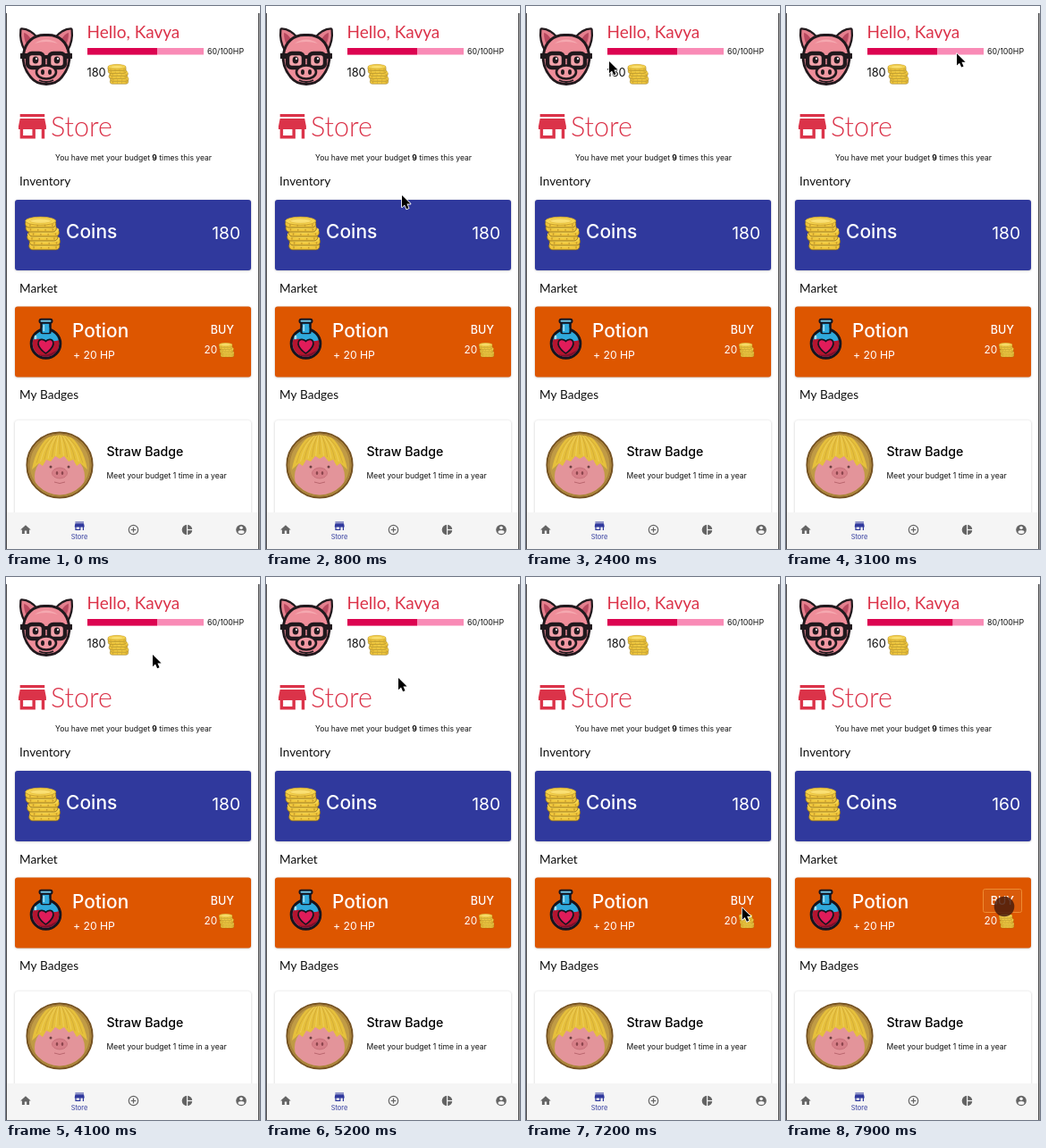
Animation of 284x608 px, one loop 8 s. Source, as an HTML page with a canvas:

```html
<!DOCTYPE html>
<html lang="en">
<head>
<meta charset="utf-8">
<title>Budget store</title>
<style>
html, body { margin: 0; width: 100%; height: 100%; overflow: hidden; background: #fff; }
canvas { display: block; width: 284px; height: 608px; }
</style>
</head>
<body>
<canvas id="stage"></canvas>
<script>
const W = 284, H = 608, LOOP = 8000, STEP = 100;
const canvas = document.getElementById('stage');
const c = canvas.getContext('2d');
const ratio = window.devicePixelRatio || 1;
canvas.width = W * ratio;
canvas.height = H * ratio;

const SANS = 'Inter, Roboto, sans-serif', LATO = 'Lato, sans-serif';
const RED = '#db3349', BLUE = '#30399d', ORANGE = '#dd5600', INK = '#111', GREY = '#646464';
const STORE = 'M20 4H4v2h16V4zm1 10v-2l-1-5H4l-1 5v2h1v6h10v-6h4v6h2v-6h1zm-9 4H6v-4h6v4z';
const HOME = 'M10 20v-6h4v6h5v-8h3L12 3 2 12h3v8z';
const ARROW = 'M0 0V14.4L3.3 11.3 5.6 16.6 8.2 15.5 5.9 10.4H10.4Z';

const APPEAR = 800, PRESS = 7500, PAID = 7600, BAR_START = 7635, BAR_TIME = 400;
// time, x, y of the pointer tip
const PATH = [
  [800, 152, 212], [1600, 121, 127], [1900, 93, 62], [2400, 93, 62],
  [3200, 205, 52], [3500, 219, 56], [3700, 178, 53], [4000, 175, 58],
  [4100, 164, 87], [4700, 148, 113], [5200, 148, 113], [6000, 244, 266],
  [6300, 243, 278], [6500, 238, 352], [7100, 241, 371], [7500, 244, 369]
];

function text(str, x, y, size, color = INK, weight = 400, family = SANS, align = 'left') {
  c.font = `${weight} ${size}px ${family}`;
  c.fillStyle = color;
  c.textAlign = align;
  c.fillText(str, x, y);
  return c.measureText(str).width;
}

function paint(fill, stroke, width = 1) {
  if (fill) { c.fillStyle = fill; c.fill(); }
  if (stroke) { c.strokeStyle = stroke; c.lineWidth = width; c.stroke(); }
}

function oval(x, y, rx, ry, fill, stroke, width) {
  c.beginPath();
  c.ellipse(x, y, rx, ry, 0, 0, 7);
  paint(fill, stroke, width);
}

function box(x, y, w, h, r, fill, stroke, width) {
  c.beginPath();
  c.roundRect(x, y, w, h, r);
  paint(fill, stroke, width);
}

function shape(d, x, y, scale, fill, stroke, width) {
  const p = new Path2D(d);
  c.save();
  c.translate(x, y);
  c.scale(scale, scale);
  c.lineJoin = 'round';
  if (stroke) { c.strokeStyle = stroke; c.lineWidth = width; c.stroke(p); }
  if (fill) { c.fillStyle = fill; c.fill(p); }
  c.restore();
}

function card(y, h, fill) {
  c.save();
  c.shadowColor = 'rgba(0,0,0,.25)';
  c.shadowBlur = 2.5 * ratio;
  c.shadowOffsetY = .6 * ratio;
  box(10, y, 264, h, 3, fill);
  c.restore();
}

// Pile of coins, drawn in a 38 by 37 box
function coins(x, y, w) {
  c.save();
  c.translate(x, y);
  c.scale(w / 38, w / 38);
  [21, 21.5, 19, 20.5, 17.5, 17].forEach((cx, i) => {
    const cy = 29 - i * 4.8;
    box(cx - 16.5, cy - 1, 33, 8, 4, '#efc63c', '#8a6a1c', .8);
    c.fillStyle = '#c4962a';
    for (let k = -3; k <= 3; k += 2) c.fillRect(cx + k * 4, cy + 3.6, 1.4, 2);
    oval(cx, cy, 16.3, 4.2, '#f7d650');
  });
  oval(17, 5, 16.3, 4.4, '#f7d650', '#b98f2a', .7);
  oval(17, 5, 11.5, 2.5, '#fae073', '#ddb236', .6);
  c.restore();
}

function pig() {
  const line = '#21191d', skin = '#ee8d99';
  for (const side of [-1, 1]) {
    c.save();
    c.translate(45, 0);
    c.scale(side, 1);
    shape('M11 36Q18 27 27.5 26.5Q29 39 23 49Z', 0, 0, 1, '#e5808e', line, 4.5);
    shape('M17 37Q21 31 25 30Q25 38 22 43Z', 0, 0, 1, '#b94a60');
    c.restore();
  }
  shape('M45 34C58 33 67 41 69 54C71 66 65 74 61 79C57 84 51 86 45 86C39 86 33 84 29 79C25 74 19 66 21 54C23 41 32 33 45 34Z', 0, 0, 1, skin, line, 6);
  shape('M32 42Q45 33 58 42Q45 38 32 42Z', 0, 0, 1, '#f5a9b0');
  for (const x of [33, 57]) {
    box(x - 9, 53, 18, 16, 5, '#f3a3ab', line, 4.5);
    oval(x, 60.5, 3.3, 4, line);
    oval(x + 1, 59, 1, 1.2, '#fff');
  }
  c.fillStyle = line;
  c.fillRect(41, 55, 8, 4);
  c.fillRect(16, 53, 9, 6);
  c.fillRect(65, 53, 9, 6);
  oval(45, 74, 11, 7.5, '#f199a3', line, 2.6);
  oval(41, 74, 2, 3, line);
  oval(49, 74, 2, 3, line);
  shape('M37 83Q45 87 53 83', 0, 0, 1, null, line, 1.8);
}

function flask() {
  const line = '#14141f', glass = '#2fa9dc';
  oval(44.5, 378, 16.3, 16.3, glass, line, 3);
  c.save();
  c.beginPath();
  c.arc(44.5, 378, 14.8, 0, 7);
  c.clip();
  shape('M26 375Q35 371 44 374T63 373V397H26Z', 0, 0, 1, '#b5142f');
  shape('M26 386Q45 398 63 380V398H26Z', 0, 0, 1, '#7d0f2b');
  c.restore();
  box(39.5, 354, 10, 12, 1, glass, line, 2.5);
  c.fillStyle = glass;
  c.fillRect(40.7, 360, 7.6, 6);
  box(37.5, 350.8, 14, 4, 2, '#6cc4e8', line, 2);
  c.fillStyle = '#a9e2f3';
  c.fillRect(41.5, 357, 1.6, 7);
  shape('M44.5 388C31 378 38.5 370 44.5 376.5C50.5 370 58 378 44.5 388Z', 0, 0, 1, '#e01c5a', line, 3.4);
  oval(33, 371, 1.4, 2.4, '#a9e2f3');
}

function badge() {
  oval(60, 514, 36.6, 36.6, '#c09b45', '#755222', 2);
  oval(60, 514, 34.4, 34.4, null, '#a9823a', 2);
  c.save();
  c.beginPath();
  c.arc(60, 514, 33.4, 0, 7);
  c.clip();
  oval(60, 527, 28, 27, '#e3949a');
  // straw fringe: a dome with a jagged lower edge
  shape('M60 477C75 479 87 496 91 519L83 512 79 515 75 508 70 510 65 504 60 507 55 504 50 510 45 508 41 515 37 512 29 519C33 496 45 479 60 477Z', 0, 0, 1, '#e6c03c');
  for (let i = -6; i <= 6; i++) {
    c.beginPath();
    c.moveTo(60 + i * .6, 479);
    c.quadraticCurveTo(60 + i * 3.3, 488, 60 + i * 4.3, 502 + Math.abs(i) * 1.6);
    paint(null, i % 2 ? '#f0d264' : '#d0a636', .8);
  }
  oval(50, 516, 1.5, 1.6, '#6d4044');
  oval(70, 516, 1.5, 1.6, '#6d4044');
  oval(60, 523, 8.5, 6, '#d77f88', '#c46d77', .8);
  oval(57, 523, 1.3, 2, '#8d454e');
  oval(63, 523, 1.3, 2, '#8d454e');
  shape('M54 533Q60 536 66 533', 0, 0, 1, null, '#b9656d', 1);
  c.restore();
}

function nav() {
  c.fillStyle = '#f5f5f5';
  c.fillRect(0, 567, W, 41);
  shape(HOME, 15, 579.5, .58, GREY);
  shape(STORE, 75, 575, .6, BLUE);
  text('Store', 82, 597, 7.4, BLUE, 400, SANS, 'center');
  oval(142.5, 586.5, 5.2, 5.2, null, GREY, 1.2);
  c.fillStyle = GREY;
  c.fillRect(139.6, 585.9, 5.8, 1.2);
  c.fillRect(141.9, 583.6, 1.2, 5.8);
  oval(202.5, 586.5, 5.8, 5.8, GREY);
  c.fillStyle = '#f5f5f5';
  c.fillRect(202, 580, 1.2, 13);
  c.fillRect(202.5, 585.9, 7, 1.2);
  oval(263, 586.5, 5.8, 5.8, GREY);
  oval(263, 584.2, 1.8, 1.8, '#f5f5f5');
  oval(263, 589, 3.5, 1.9, '#f5f5f5');
}

function header(t) {
  const paid = t >= PAID;
  pig();
  text('Hello, Kavya', 90.5, 36, 19, RED, 400, LATO);
  const grow = Math.min(1, Math.max(0, (t - BAR_START) / BAR_TIME));
  c.fillStyle = '#f98bb6';
  c.fillRect(91, 47, 130, 7.5);
  c.fillStyle = '#dc0450';
  c.fillRect(91, 47, 130 * (.6 + .2 * grow), 7.5);
  text(paid ? '80/100HP' : '60/100HP', 225, 54, 8.8);
  text(paid ? '160' : '180', 90.5, 79, 12.8);
  coins(113.5, 65, 23.5);
}

function title() {
  shape(STORE, 8.8, 114, 1.72, RED);
  text('Store', 50, 146, 30.5, RED, 300, LATO);
  let x = 55;
  x += text('You have met your budget ', x, 173, 8.54);
  x += text('9', x, 173, 8.54, INK, 700);
  text(' times this year', x, 173, 8.54);
}

function content(t) {
  const sections = [['Inventory', 201], ['Market', 321], ['My Badges', 440]];
  for (const [name, y] of sections) text(name, 15, y, 13.6, INK, 400, LATO);

  card(217, 79, BLUE);
  coins(21, 235.5, 39.5);
  text('Coins', 67, 260, 21, '#fff', 500);
  text(t >= PAID ? '160' : '180', 262, 261, 19.2, '#fff', 400, SANS, 'right');

  card(336.5, 79, ORANGE);
  flask();
  text('Potion', 74, 371, 20.8, '#fff', 500);
  text('+ 20 HP', 75, 395, 12.2, '#fff');
  if (t >= PRESS) box(220.5, 349.5, 43, 26, 2, '#d95b0b', '#ee8b32', 1);
  text('BUY', 255, 367, 12.5, '#fff', 500, SANS, 'right');
  text('20', 221.5, 389, 11.8, '#fff');
  coins(238, 377, 17);

  card(464, 120, '#fff');
  badge();
  text('Straw Badge', 112.4, 503.5, 14.15, '#000', 500);
  text('Meet your budget 1 time in a year', 112.5, 529, 8.56);
}

function pointer(t) {
  if (t < APPEAR) return;
  if (t >= PRESS) {
    oval(244, 369, 11.3, 11.3, 'rgba(74,28,12,.86)');
    return;
  }
  const i = PATH.findIndex(p => p[0] > t);
  const [t0, x0, y0] = PATH[i - 1], [t1, x1, y1] = PATH[i];
  const u = (t - t0) / (t1 - t0);
  shape(ARROW, x0 + (x1 - x0) * u, y0 + (y1 - y0) * u, .92, '#000', '#fff', 1.8);
}

function draw(t) {
  c.setTransform(ratio, 0, 0, ratio, 0, 0);
  c.fillStyle = '#fff';
  c.fillRect(0, 0, W, H);
  header(t);
  title();
  content(t);
  nav();
  c.fillStyle = '#4a4a4c';
  c.fillRect(0, 8, 1, H);
  c.fillRect(W - 2, 8, 1.5, H);
  pointer(t);
}

const start = performance.now();
function frame() {
  const t = (performance.now() - start) % LOOP;
  draw(Math.floor(t / STEP) * STEP);
  requestAnimationFrame(frame);
}
frame();
</script>
</body>
</html>
```
